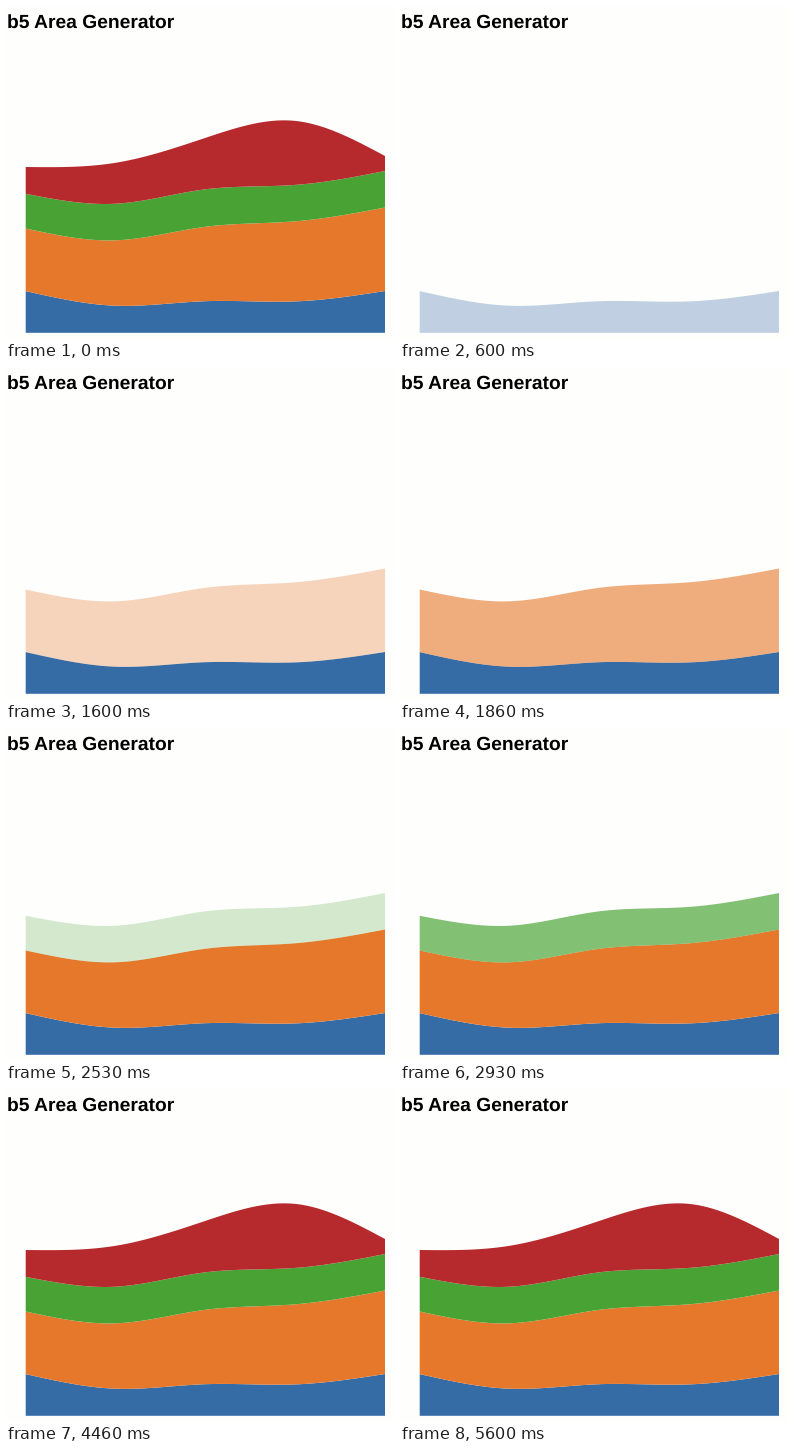
A matplotlib script for the animation above (5.66 s loop, 388x333 px).

```python
import matplotlib.pyplot as plt
import numpy as np
from matplotlib.animation import FuncAnimation

plt.rcParams["text.hinting"] = "none"

W, H, DPI = 388, 333, 100
LOOP, INTERVAL = 5660, 20
STEP = 200 / 3                    # the picture refreshes 15 times a second
RESET = 60                        # the full chart is cleared here
FADE_START, FADE_GAP, FADE_TIME = 320, 1000, 900

LEFT, RIGHT, BASE = 19.2, 378.5, 326.3
COLORS = ["#366ca6", "#e6782b", "#49a334", "#b6292d"]
TOPS = [
    [284.6, 299.2, 294.7, 294.9, 284.5],
    [222, 233.8, 220.3, 214.8, 201],
    [187.3, 197.2, 182.8, 178.4, 164.5],
    [160.5, 156.3, 131.4, 114.4, 149.5],
]


def natural_spline(ys, u):
    """Natural cubic spline through evenly spaced values, u in knot units."""
    y = np.asarray(ys, float)
    n = len(y)
    A = np.eye(n)
    b = np.zeros(n)
    for i in range(1, n - 1):
        A[i, i - 1:i + 2] = 1, 4, 1
        b[i] = 6 * (y[i - 1] - 2 * y[i] + y[i + 1])
    m = np.linalg.solve(A, b)
    i = np.minimum(u.astype(int), n - 2)
    t = u - i
    s = 1 - t
    return (s * y[i] + t * y[i + 1]
            + ((s**3 - s) * m[i] + (t**3 - t) * m[i + 1]) / 6)


def opacity(layer, ms):
    if ms < RESET:
        return 1.0
    start = FADE_START + layer * FADE_GAP
    return float(np.clip((ms - start) / FADE_TIME, 0, 1))


fig = plt.figure(figsize=(W / DPI, H / DPI), dpi=DPI, facecolor="#fefefd")
ax = fig.add_axes([0, 0, 1, 1])
ax.set_xlim(0, W)
ax.set_ylim(H, 0)
ax.axis("off")

ax.text(0.8, 21.5, "b5 Area Generator", family="Liberation Sans",
        weight="bold", size=19.3 * 72 / DPI, color="black", va="baseline")

u = np.linspace(0, len(TOPS[0]) - 1, 361)
x = LEFT + (RIGHT - LEFT) * u / u[-1]
areas = []
lower = np.full_like(x, BASE)
for color, knots in zip(COLORS, TOPS):
    upper = natural_spline(knots, u)
    areas.append(ax.fill_between(x, lower, upper, color=color, linewidth=0))
    lower = upper


def update(i):
    ms = int((i * INTERVAL + 17) / STEP) * STEP
    for layer, area in enumerate(areas):
        area.set_alpha(opacity(layer, ms))
    return areas


anim = FuncAnimation(fig, update, frames=LOOP // INTERVAL, interval=INTERVAL,
                     repeat=True, repeat_delay=0)
plt.show()
```
